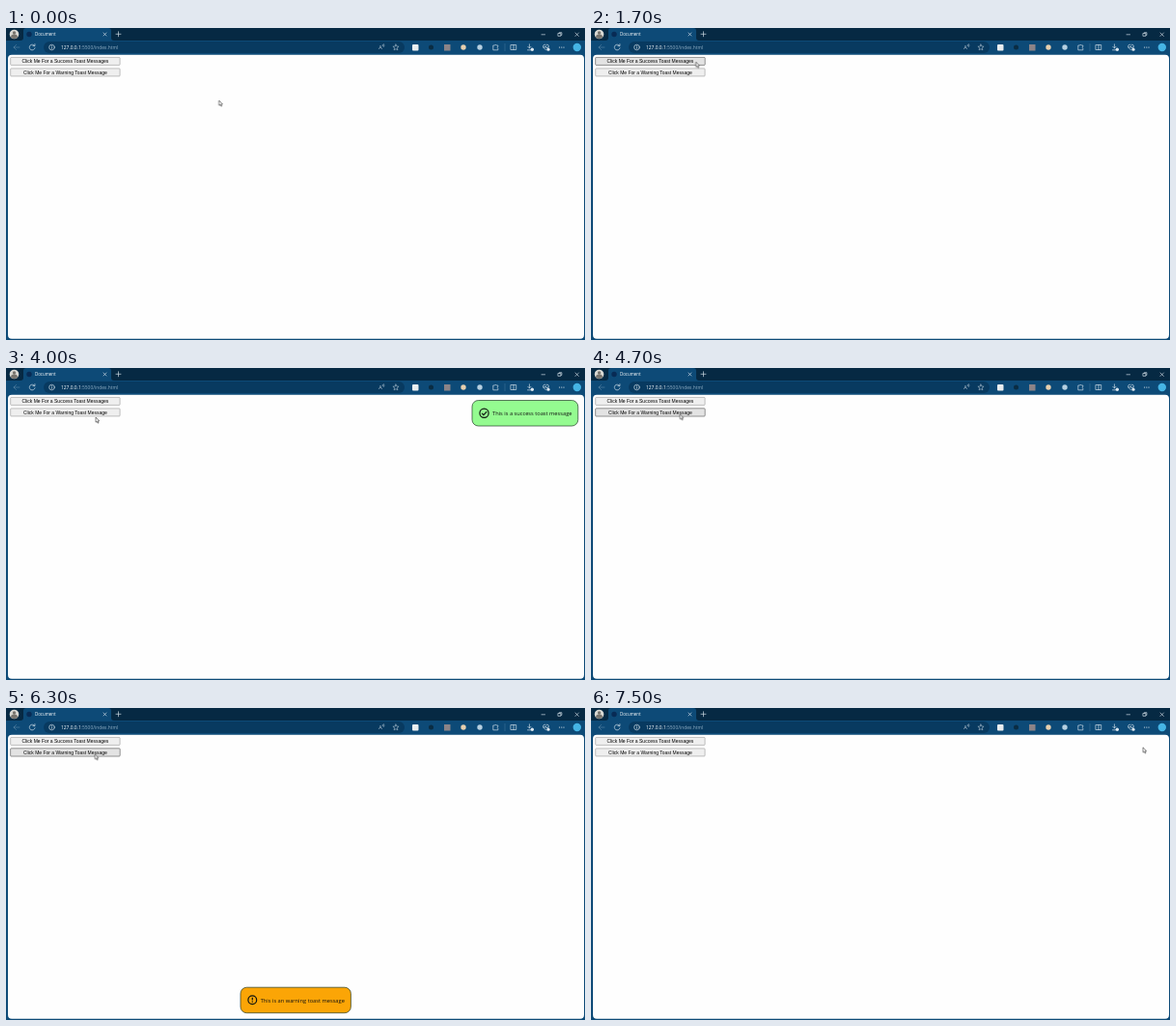
Animation of 600x323 px, one loop 7.6 s. Source, as an HTML page:

```html
<!DOCTYPE html>
<html lang="en">
<head>
<meta charset="utf-8">
<title>Toast messages</title>
<style>
  html, body { margin: 0; width: 100%; height: 100%; overflow: hidden; background: #0d4a77; }
  svg { display: block; width: 600px; height: 323px; }
  text { font-family: "Open Sans", "Noto Sans", sans-serif; }
  .line { fill: none; stroke: #dce7ef; stroke-width: .65; stroke-linecap: round; stroke-linejoin: round; }
  .dim { opacity: .35; }
  .ui { fill: #fff; }
  .button rect { fill: #efefef; stroke: #858585; stroke-width: .5; }
  .button .hover { fill: #e3e3e3; stroke: #555; }
  .button text { font: 5px "Liberation Sans", Arial, sans-serif; text-anchor: middle; fill: #000; }
  .toast text { font-size: 5.69px; fill: #111; }
  .toast rect { stroke: #17301c; stroke-width: .65; }
  .toast .icon { fill: none; stroke: #101510; stroke-width: 1.2; }

  /* a small lead keeps each step clear of its boundary */
  .hover, .toast, .cursor { animation: 7.6s step-end -10ms infinite; }
  .first .hover { animation-name: hover-first; }
  .second .hover { animation-name: hover-second; }
  .success { animation-name: success; }
  .warning { animation-name: warning; }
  .cursor { animation-name: pointer; }

  @keyframes hover-first { 0%, 46.053% { opacity: 0 } 14.474% { opacity: 1 } 100% { opacity: 0 } }
  @keyframes hover-second { 0%, 85.526% { opacity: 0 } 55.263% { opacity: 1 } 100% { opacity: 0 } }
  @keyframes success { 0%, 56.579% { opacity: 0 } 27.632% { opacity: 1 } 100% { opacity: 0 } }
  @keyframes warning { 0%, 93.421% { opacity: 0 } 67.105% { opacity: 1 } 100% { opacity: 0 } }
  @keyframes pointer {
    0%      { transform: translate(220.7px, 75px); animation-timing-function: steps(2) }
    2.632%  { transform: translate(221px, 79px); animation-timing-function: steps(6) }
    10.526% { transform: translate(126px, 41px); animation-timing-function: steps(4) }
    15.789% { transform: translate(108.7px, 35.2px) }
    43.421% { transform: translate(108.7px, 35.2px); animation-timing-function: steps(3) }
    47.368% { transform: translate(100px, 43px); animation-timing-function: steps(2) }
    50%     { transform: translate(94px, 55px); animation-timing-function: steps(2) }
    52.632% { transform: translate(93px, 51px); animation-timing-function: steps(5) }
    59.211% { transform: translate(92.2px, 47.7px) }
    84.211% { transform: translate(92.2px, 47.7px); animation-timing-function: steps(5) }
    90.789% { transform: translate(529.2px, 34.5px); animation-timing-function: steps(3) }
    94.737% { transform: translate(575px, 41px); animation-timing-function: steps(3) }
    98.684%, 100% { transform: translate(572px, 40.7px) }
  }
</style>
</head>
<body>
<svg viewBox="0 0 600 323">
  <!-- window and tab strip -->
  <rect width="600" height="323" fill="#0d4a77"/>
  <rect width="600" height="13" fill="#062943"/>
  <path d="M15 13q3 0 3-3V3q0-3 3-3h85q3 0 3 3v7q0 3 3 3z" fill="#0d4a77"/>
  <circle cx="8.5" cy="6.5" r="4.8" fill="#d9d8d3"/>
  <path d="M5 9.5a3.5 3 0 0 1 7 0a4.8 4.8 0 0 1-7 0z" fill="#77736d"/>
  <circle cx="8.5" cy="5" r="1.7" fill="#77736d"/>
  <circle cx="24" cy="6.5" r="2.7" fill="#082b55"/>
  <text class="ui" x="30" y="8" font-size="4.4">Document</text>
  <path class="line" d="M101 5l3 3m0-3l-3 3M114 6.3h5m-2.5-2.5v5M555 6.8h3.5M590 5l3.4 3.4m0-3.4l-3.4 3.4"/>
  <path class="line" d="M572.3 5.5h2.6v2.8h-2.6zM573.3 5.3v-.6h2.6v2.7h-.7"/>

  <!-- toolbar -->
  <rect x="39" y="14" width="374" height="12" rx="6" fill="#083a60"/>
  <path class="line dim" d="M14 20H8m2.6-2.6L8 20l2.6 2.6"/>
  <path class="line" d="M29.6 18.4a2.9 2.9 0 1 0 .4 2.3M29.9 16.6v2h-2"/>
  <circle class="line" cx="47.5" cy="20" r="2.8"/>
  <path class="line" d="M47.5 19.8v1.5m0-2.8v.1"/>
  <text x="57" y="21.8" font-size="4.9" fill="#fff">127.0.0.1<tspan fill="#8fadc3">:5500/index.html</tspan></text>
  <g opacity=".75">
    <text class="ui" x="386.3" y="22" font-size="5.5">A</text>
    <path class="line" d="M390.4 17.3q.7.7 0 1.5m1.1-2.2q1.2 1.4 0 2.9"/>
    <path class="line" d="M404 17l.9 2 2.2.2-1.7 1.4.5 2.2-1.9-1.1-1.9 1.1.5-2.2-1.7-1.4 2.2-.2z"/>
  </g>
  <rect x="421" y="17" width="6.5" height="6.5" rx="1" fill="#e9eef0"/>
  <circle cx="440.5" cy="20" r="2.5" fill="#0a2c42"/>
  <rect x="454" y="17" width="6.5" height="6.5" fill="#8b8387"/>
  <circle cx="474" cy="20" r="2.7" fill="#e6cfae"/>
  <circle cx="491" cy="20" r="2.7" fill="#b6cfe0"/>
  <path class="line" d="M505.2 18h1.3q.8-1.8 1.7 0h1.6v1.4q-1.7.8 0 1.7v1.7h-4.6z"/>
  <path d="M517 16v8" stroke="#49799c" stroke-width=".5"/>
  <path class="line" d="M523.3 17.5h5.4v5h-5.4zM526 17.5v5"/>
  <path class="line" d="M542.4 16.8v4m-1.6-1.5l1.6 1.6 1.6-1.6M540.5 22.8h3"/>
  <circle cx="545.3" cy="22.3" r="1.7" fill="#dce7ef"/>
  <path class="line" d="M559.5 22.8l-2.5-2.5q-1-1.6.2-2.7 1.4-1 2.3.4 1-1.4 2.4-.4 1 1 .3 2.2M557 20h1.4l.8-1 1 1.8.6-.8h1"/>
  <circle cx="562" cy="22.2" r="1.6" fill="#dce7ef"/>
  <g class="ui"><circle cx="573.6" cy="20" r=".55"/><circle cx="575.8" cy="20" r=".55"/><circle cx="578" cy="20" r=".55"/></g>
  <circle cx="591.8" cy="20" r="4.2" fill="#45b4e5"/>

  <!-- page -->
  <rect x="2" y="27.7" width="597" height="294" rx="4" fill="#fefefe"/>
  <g class="button first">
    <rect x="4.7" y="30.4" width="113.4" height="8" rx=".8"/>
    <rect class="hover" x="4.7" y="30.4" width="113.4" height="8" rx=".8"/>
    <text x="61.4" y="36.1">Click Me For a Success Toast Messages</text>
  </g>
  <g class="button second">
    <rect x="4.7" y="41.9" width="113.4" height="8" rx=".8"/>
    <rect class="hover" x="4.7" y="41.9" width="113.4" height="8" rx=".8"/>
    <text x="61.4" y="47.6">Click Me For a Warning Toast Message</text>
  </g>

  <g class="toast success">
    <rect x="483" y="33.5" width="109.8" height="26.5" rx="6.5" fill="#94fb90"/>
    <circle class="icon" cx="495.5" cy="46.7" r="4.6"/>
    <path class="icon" d="M493.1 46.8l1.8 1.8 3.3-3.5"/>
    <text x="504" y="48.9">This is a success toast message</text>
  </g>
  <g class="toast warning">
    <rect x="243" y="289.2" width="114.4" height="26.5" rx="6.5" fill="#fba506"/>
    <circle class="icon" cx="255.3" cy="302.2" r="4.4"/>
    <path class="icon" d="M255.3 299.7v2.9m0 .9v1.2"/>
    <text x="263.7" y="304.6">This is an warning toast message</text>
  </g>

  <path class="cursor" d="M0 0v5.2l1.2-1 .9 1.9.9-.4-.9-1.8h1.6z" fill="#fff" stroke="#222" stroke-width=".55" stroke-linejoin="round"/>
</svg>
</body>
</html>
```
